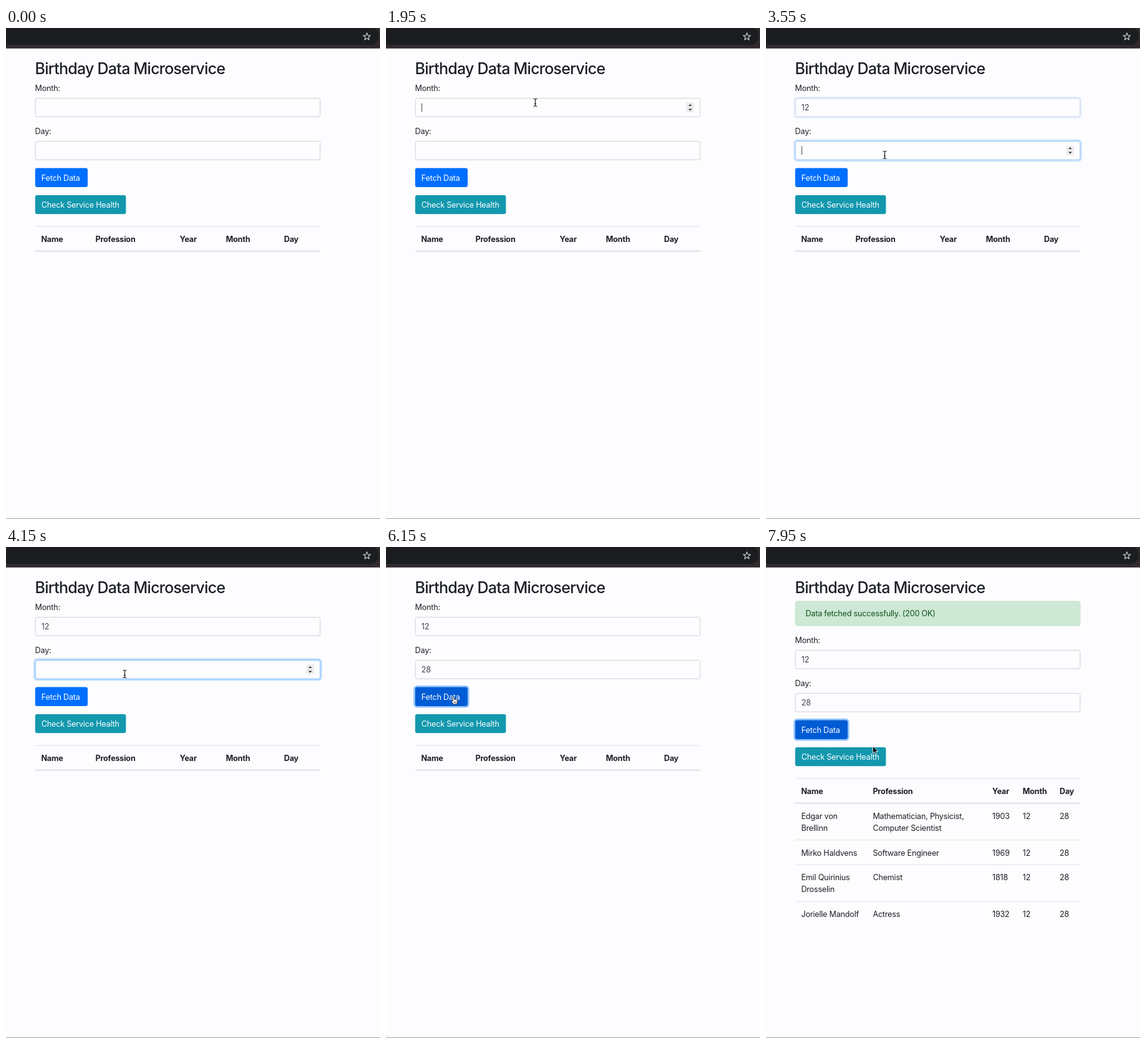
An HTML page for the animation above (8 s loop, 600 by 787 pixels).

```html
<!DOCTYPE html>
<html lang="en">
<head>
<meta charset="utf-8">
<title>Birthday Data Microservice</title>
<style>
html, body { margin: 0; width: 100%; height: 100%; overflow: hidden; background: #fdfcfe; }
svg { display: block; }
text {
  font: 400 12.6px Inter, "Open Sans", sans-serif;
  font-optical-sizing: none;
  letter-spacing: -0.016em;
  fill: #1c2024;
}
.title { font-size: 25px; font-weight: 500; letter-spacing: -0.03em; }
.bold { font-weight: 700; }
.value { fill: #40464c; }
.light { fill: #fff; }
.ok { fill: #10501f; }
</style>
</head>
<body>
<svg id="stage" width="600" height="787" viewBox="0 0 600 787"></svg>
<script>
const LOOP = 8000, STEP = 50, FADE = 150, BLINK = 500, SHIFT = 53;
const LEFT = 46.8, WIDTH = 457.6, BOX_H = 30.4;
const MONTH_Y = 112.2, DAY_Y = 181.2, FETCH_Y = 224.6, CHECK_Y = 267.9;
const FETCH_W = 84.2, CHECK_W = 145.6;

// Interaction times in ms
const FOCUS_MONTH = 1950, FOCUS_DAY = 3450, HOVER_FETCH = 5250, CLICK_FETCH = 5850, RESULT = 6450;
const fields = [
  { id: 'month', y: MONTH_Y, from: FOCUS_MONTH, to: FOCUS_DAY, keys: [[2350, '1'], [2700, '12']] },
  { id: 'day', y: DAY_Y, from: FOCUS_DAY, to: CLICK_FETCH, keys: [[4250, '2'], [4650, '28']] }
];

// Pointer stops: time, x, y, easing of the way there
const easing = {
  line: u => u,
  in: u => u * u,
  out: u => 1 - (1 - u) ** 2,
  both: u => u * u * (3 - 2 * u)
};
const path = [
  [350, 588, -12, 'line'], [1200, 300, 97, 'line'], [1800, 239.5, 119.5, 'out'],
  [2950, 239.5, 119.5, 'line'], [3250, 190.5, 203.5, 'both'],
  [4750, 190.5, 203.5, 'line'], [5100, 144, 219, 'in'], [5500, 108, 240, 'out'],
  [7200, 108, 240, 'line'], [7950, 171.5, 319.5, 'both']
];
// Typing hides the pointer until it moves again
const hidden = [[0, 400], [2350, 2950], [4250, 4800]];

const columns = { empty: [56.4, 143.5, 278.8, 352.8, 446], full: [56.4, 171.4, 363, 411.8, 471] };
const heads = ['Name', 'Profession', 'Year', 'Month', 'Day'];
const rows = [
  [382.5, 'Edgar von|Brellinn', 'Mathematician, Physicist,|Computer Scientist', '1903'],
  [441.5, 'Mirko Haldvens', 'Software Engineer', '1969'],
  [480.5, 'Emil Quirinius|Drosselin', 'Chemist', '1818'],
  [539.5, 'Jorielle Mandolf', 'Actress', '1932']
];
const rules = [416.5, 456, 515];

const label = (x, y, str, cls = '', id = '') => `<text x="${x}" y="${y}" class="${cls}" id="${id}">${str}</text>`;
const box = (x, y, w, h, attrs) => `<rect x="${x}" y="${y}" width="${w}" height="${h}" ${attrs}/>`;
const rule = (y, h, color = '#dce0e4') => box(LEFT, y, WIDTH, h, `fill="${color}"`);
const lines = (x, y, str) => str.split('|').map((s, i) => label(x, y + i * 19.2, s)).join('');
const ring = (id, y, w, attrs) =>
  box(LEFT - 1.3, y - 1.3, w + 2.6, BOX_H + 2.6, `id="${id}" rx="4.4" fill="none" stroke-width="2.6" ${attrs}`);

const field = ({ id, y }) => `
  ${ring(id + 'Ring', y, WIDTH, 'stroke="#bcdcff"')}
  ${box(LEFT + .4, y + .4, WIDTH - .8, BOX_H - .8, `id="${id}Box" rx="3" fill="#fdfcfe" stroke-width="1"`)}
  ${label(56.8, y + 19.9, '', 'value', id + 'Text')}
  ${box(57, y + 8.4, .9, 13.6, `id="${id}Caret" fill="#30353a"`)}
  <g id="${id}Spin" transform="translate(488 ${y + 15.1})">
    ${box(-6.2, -7.8, 12.4, 15.6, 'rx="1" fill="#ececee"')}
    <path d="M-2.8-2.2L0-5.4L2.8-2.2ZM-2.8 2.2L0 5.4L2.8 2.2Z" fill="#3c3c3e"/>
  </g>`;

const starPoints = Array.from({ length: 10 }, (_, i) => {
  const r = i % 2 ? 2.6 : 6.2, a = (i / 5 - .5) * Math.PI;
  return `${579 + r * Math.cos(a)},${14 + r * Math.sin(a)}`;
}).join(' ');

const stage = document.getElementById('stage');
stage.innerHTML = `
  ${box(0, 0, 600, 787, 'fill="#fdfcfe"')}
  ${box(0, 0, 600, 32.8, 'fill="#302a2d"')}
  ${box(-30, -1, 628, 28, 'rx="13" fill="#1b1d20"')}
  <polygon points="${starPoints}" fill="none" stroke="#c6c8cb" stroke-width="1.2" stroke-linejoin="round"/>
  ${box(0, 786, 600, 1, 'fill="#a2a1a4"')}
  ${label(46.6, 74, 'Birthday Data Microservice', 'title')}
  <g id="alert">
    ${box(LEFT + .4, 86.9, WIDTH - .8, 39.2, 'rx="3" fill="#cde8d4" stroke="#c0e2c9" stroke-width=".9"')}
    ${label(63.4, 111.3, 'Data fetched successfully. (200 OK)', 'ok')}
  </g>
  <g id="form">
    ${label(46.6, 101, 'Month:')}${label(46.6, 170, 'Day:')}
    ${fields.map(field).join('')}
    ${ring('fetchRing', FETCH_Y, FETCH_W, 'stroke="#8fc5ff"')}
    ${box(LEFT, FETCH_Y, FETCH_W, BOX_H, 'id="fetch" rx="3.2"')}
    ${label(56.8, FETCH_Y + 20, 'Fetch Data', 'light')}
    ${box(LEFT, CHECK_Y, CHECK_W, BOX_H, 'rx="3.2" fill="#1398ae"')}
    ${label(56.8, CHECK_Y + 20, 'Check Service Health', 'light')}
    ${rule(317.7, .9)}${rule(356.9, 1.5, '#d6dbdf')}
    ${heads.map((h, i) => label(0, 342.5, h, 'bold', 'head' + i)).join('')}
    <g id="rows">
      ${rules.map(y => rule(y - .4, .9)).join('')}
      ${rows.map(([y, ...cells]) =>
        [...cells, '12', '28'].map((c, i) => lines(columns.full[i], y, c)).join('')).join('')}
    </g>
  </g>
  <g id="pointer" stroke-linejoin="round" stroke-linecap="round">
    <path id="arrow" d="M0 0V11.2L2.6 8.8L4.3 12.7L6.2 11.9L4.5 8.1H8Z" fill="#000" stroke="#fff" stroke-width=".8"/>
    <g id="beam" fill="none">
      <path d="M-2.6-6Q0-6 0-4.6Q0-6 2.6-6M0-4.6V4.6M-2.6 6Q0 6 0 4.6Q0 6 2.6 6M-1.2 1.8H1.2" stroke="#fff" stroke-width="2"/>
      <path d="M-2.6-6Q0-6 0-4.6Q0-6 2.6-6M0-4.6V4.6M-2.6 6Q0 6 0 4.6Q0 6 2.6 6M-1.2 1.8H1.2" stroke="#111" stroke-width="1.1"/>
    </g>
    <g id="hand" stroke="#000" stroke-width=".8">
      <path d="M-1.1.4Q0-.9 1.1.4V4.3Q2.2 3.4 3.1 4.6Q4.2 3.9 5 5.1Q6.6 4.6 6.7 6.2V8.6Q6.6 10.3 5.6 12.2H.2Q-1.2 9.6-3.3 7.4Q-3.4 5.8-1.1 7.1Z" fill="#fff"/>
      <path d="M1.4 8V10.4M3 8V10.4M4.6 8V10.4" stroke-width=".6"/>
    </g>
  </g>`;

const el = {};
stage.querySelectorAll('[id]').forEach(node => { if (node.id) el[node.id] = node; });

const show = (node, on) => node.setAttribute('display', on ? 'inline' : 'none');
const fade = (t, start) => easing.both(Math.min(1, Math.max(0, (t - start) / FADE)));
const mix = (a, b, u) => `rgb(${a.map((v, i) => Math.round(v + (b[i] - v) * u))})`;
const inside = (p, y, w) => p.x >= LEFT && p.x <= LEFT + w && p.y >= y && p.y <= y + BOX_H;

function pointerAt(t) {
  const i = path.findIndex(k => k[0] > t);
  if (i < 1) {
    const [, x, y] = i ? path[path.length - 1] : path[0];
    return { x, y };
  }
  const [t0, x0, y0] = path[i - 1], [t1, x1, y1, ease] = path[i];
  const u = easing[ease]((t - t0) / (t1 - t0));
  return { x: x0 + (x1 - x0) * u, y: y0 + (y1 - y0) * u };
}

function drawField({ id, y, from, to, keys }, t, hover) {
  const focused = t >= from && t < to;
  const glow = fade(t, from) - fade(t, to);
  const typed = keys.filter(k => t >= k[0]).pop();
  const text = el[id + 'Text'];
  text.textContent = typed ? typed[1] : '';
  el[id + 'Ring'].setAttribute('opacity', glow);
  el[id + 'Box'].setAttribute('stroke', mix([206, 211, 216], [125, 186, 255], glow));
  const since = t - (typed ? typed[0] : from);
  show(el[id + 'Caret'], focused && Math.floor(since / BLINK) % 2 === 0);
  el[id + 'Caret'].setAttribute('x', 57 + text.getComputedTextLength());
  show(el[id + 'Spin'], focused || hover);
}

function draw(t) {
  const done = t >= RESULT, dy = done ? SHIFT : 0;
  const p = pointerAt(t);
  const visible = !hidden.some(([a, b]) => t >= a && t < b);
  const over = fields.map(f => inside(p, f.y + dy, WIDTH));
  const onButton = inside(p, FETCH_Y + dy, FETCH_W) || inside(p, CHECK_Y + dy, CHECK_W);
  const shape = over.includes(true) ? 'beam' : onButton ? 'hand' : 'arrow';

  show(el.alert, done);
  show(el.rows, done);
  el.form.setAttribute('transform', `translate(0 ${dy})`);
  columns[done ? 'full' : 'empty'].forEach((x, i) => el['head' + i].setAttribute('x', x));
  fields.forEach((f, i) => drawField(f, t, over[i]));
  el.fetch.setAttribute('fill', mix([0, 111, 255], [0, 92, 212], fade(t, HOVER_FETCH)));
  el.fetchRing.setAttribute('opacity', fade(t, CLICK_FETCH));

  show(el.pointer, visible);
  el.pointer.setAttribute('transform', `translate(${p.x} ${p.y})`);
  ['arrow', 'beam', 'hand'].forEach(s => show(el[s], s === shape));
}

const start = performance.now();
function tick() {
  const t = (performance.now() - start) % LOOP;
  draw(Math.floor(t / STEP) * STEP);
  requestAnimationFrame(tick);
}
tick();
</script>
</body>
</html>
```
